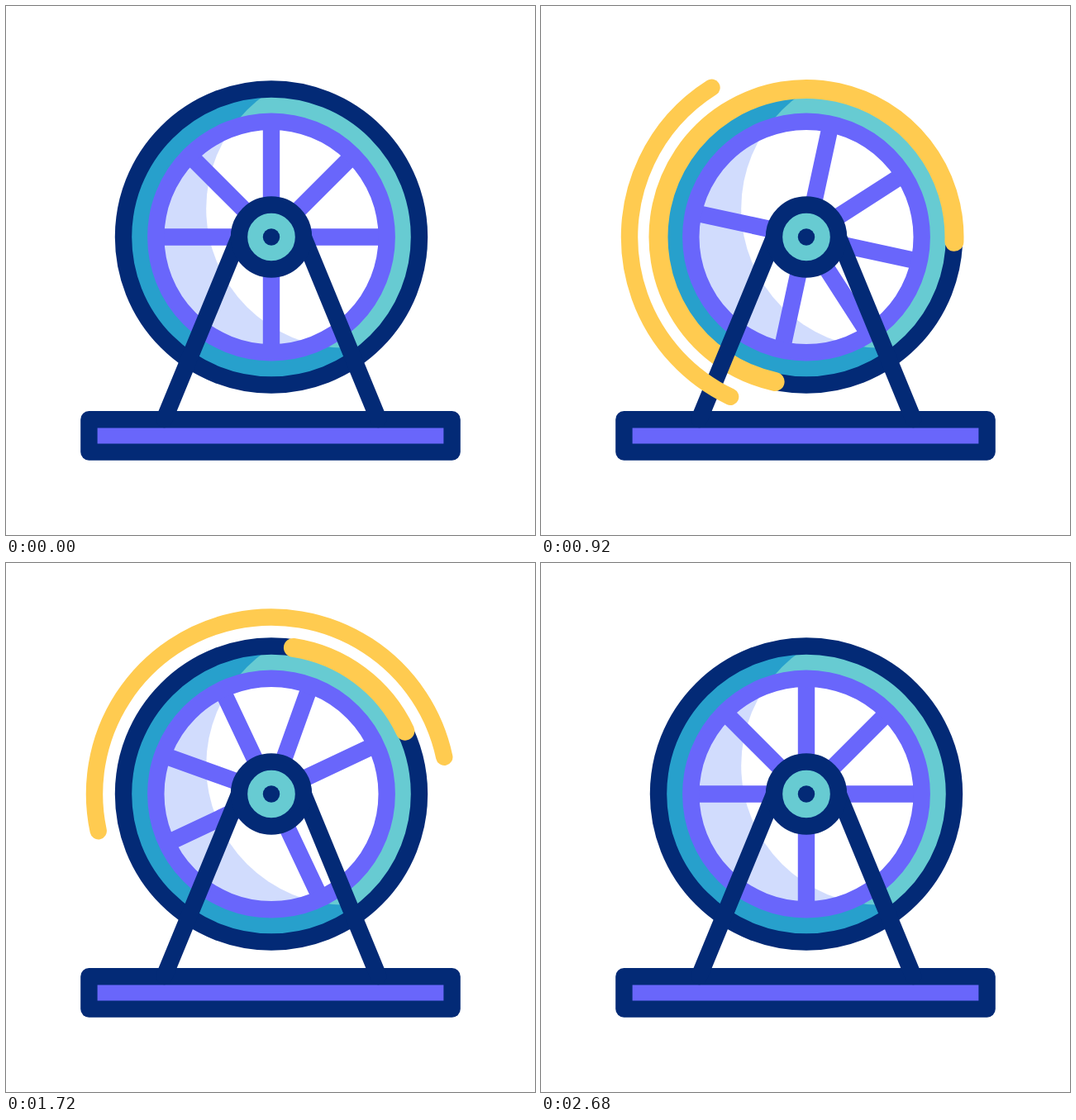
An HTML page for the animation above (3000 ms loop, 640 px wide and 640 px high).

```html
<!DOCTYPE html>
<html lang="en">
<head>
<meta charset="utf-8">
<title>Spinning wheel</title>
<style>
  html, body { margin: 0; width: 100%; height: 100%; overflow: hidden; background: #fff; }
  svg { display: block; width: 100%; height: 100%; }
  .line { fill: none; stroke-width: 20.4; }
  .navy { stroke: #032a76; }
  .purple { stroke: #6966fb; }
  .streak { fill: none; stroke: #ffcb50; stroke-linecap: round; }
</style>
</head>
<body>
<svg viewBox="0 0 640 640">
  <defs>
    <clipPath id="lit"><circle cx="90" cy="-34.5" r="168.8"/></clipPath>
  </defs>

  <g transform="translate(321 279.5)">
    <circle r="172" fill="#27a0cc"/>
    <circle r="172" fill="#67cbd2" clip-path="url(#lit)"/>
    <circle r="140" fill="#d1dcfd"/>
    <circle r="140" fill="#fff" clip-path="url(#lit)"/>
    <circle class="line navy" r="179"/>
    <g class="spin">
      <path id="spokes" class="line purple"/>
      <circle id="inner" class="streak" r="179" stroke-width="23" pathLength="360"/>
    </g>
    <circle class="line purple" r="139.7"/>
  </g>

  <rect class="line navy" x="100.4" y="500.2" width="439.2" height="39.4"
        stroke-linejoin="round" style="fill:#6966fb"/>
  <path class="line navy" d="M282 280L191.5 500M360 280L450.5 500" stroke-linecap="round"/>

  <g transform="translate(321 279.5)">
    <circle class="line navy" r="39" style="fill:#67cbd2"/>
    <circle r="10.2" fill="#032a76"/>
    <g class="spin">
      <circle id="outer" class="streak" r="214" stroke-width="20.4" pathLength="360"
              transform="rotate(13.2)"/>
    </g>
  </g>
</svg>

<script>
const LOOP = 3000, STEP = 40;
const $ = id => document.getElementById(id);
const spinners = document.querySelectorAll('.spin');

$('spokes').setAttribute('d', [0, 90, 180, 225, 270, 315].map(deg => {
  const a = deg * Math.PI / 180;
  return `M0 0L${140 * Math.cos(a)} ${140 * Math.sin(a)}`;
}).join(''));

const smooth = p => p * p * (3 - 2 * p);

// Ease with horizontal tangents and handle positions x1, x2.
const ease = (x1, x2) => x => {
  let lo = 0, hi = 1;
  for (let i = 0; i < 24; i++) {
    const s = (lo + hi) / 2, r = 1 - s;
    if (3 * r * r * s * x1 + 3 * r * s * s * x2 + s ** 3 < x) lo = s; else hi = s;
  }
  return smooth(lo);
};

// Wind up, spin past a full turn, settle: [from ms, to ms, from deg, to deg, easing]
const turns = [
  [0, 336, 0, -10, smooth],
  [336, 2200, -10, 370, ease(.333, .48)],
  [2200, 2690, 370, 360, smooth]
];

// Each streak's head runs one turn, then its tail follows.
const streaks = [
  { el: $('inner'), head: [320, 1240], tail: [1000, 1960] },
  { el: $('outer'), head: [560, 1480], tail: [1240, 2200] }
];

const progress = (t, from, to) => Math.min(1, Math.max(0, (t - from) / (to - from)));

function angle(t) {
  const [from, to, a, b, fn] = turns.find(s => t < s[1]) || turns[2];
  return a + (b - a) * fn(progress(t, from, to));
}

function draw(t) {
  spinners.forEach(g => g.setAttribute('transform', `rotate(${angle(t)})`));
  for (const { el, head, tail } of streaks) {
    const end = 360 * smooth(progress(t, ...head));
    const start = 360 * smooth(progress(t, ...tail));
    el.style.visibility = end > start ? 'visible' : 'hidden';
    el.setAttribute('stroke-dasharray', `${end - start} 400`);
    el.setAttribute('stroke-dashoffset', -start);
  }
}

function tick() {
  const t = (performance.now() + 6) % LOOP;
  draw(Math.floor(t / STEP) * STEP);
  requestAnimationFrame(tick);
}
tick();
</script>
</body>
</html>
```
